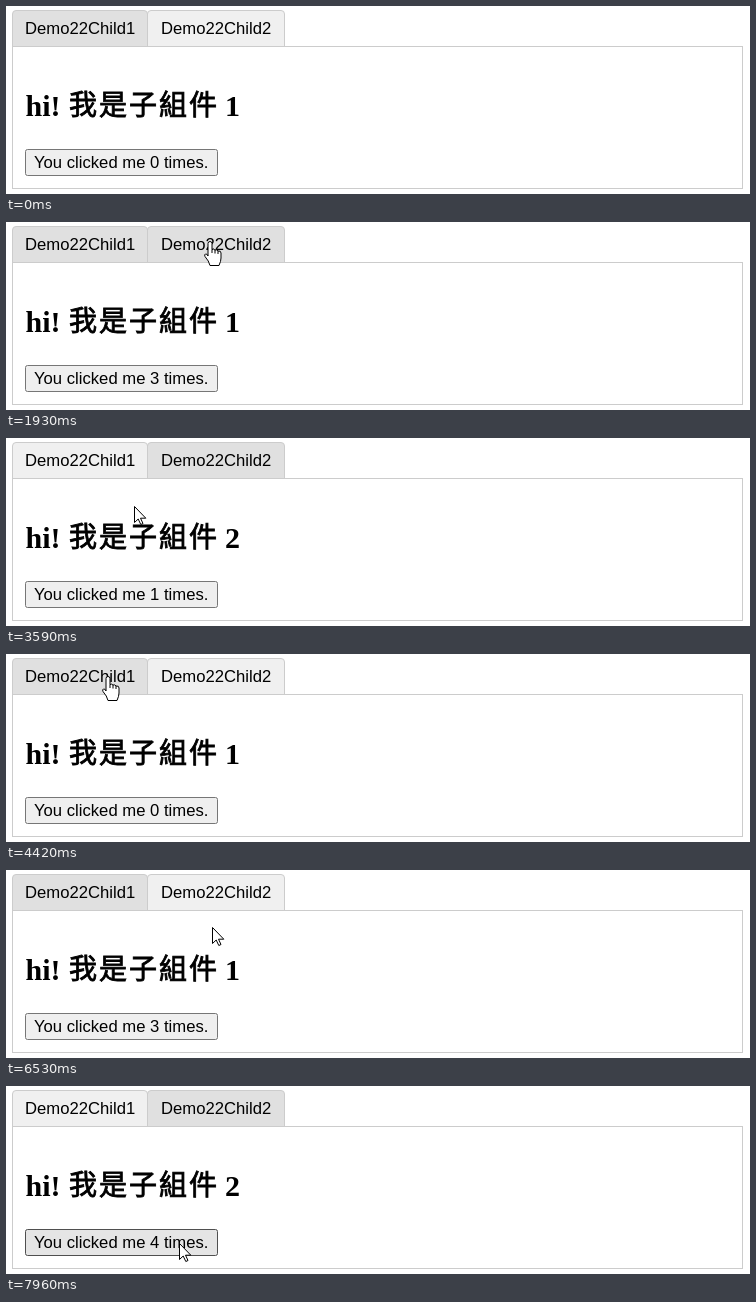
An HTML page for the animation above (8000 ms loop, 744 by 188 pixels).

```html
<!DOCTYPE html>
<html lang="zh-Hant">
<head>
<meta charset="utf-8">
<style>
  html, body { margin: 0; height: 100%; overflow: hidden; background: #fff; }
  svg { display: block; font: 16.67px "Liberation Sans", Arial, sans-serif; }
  .tab { stroke: #ccc; fill: #f0f0f0; }
  .tab.on { fill: #e0e0e0; }
  .panel { fill: #fff; stroke: #ccc; }
  .title { font: bold 30px "Liberation Serif", Times, serif; }
  .cjk { font: 500 28px "Noto Sans CJK TC", "Noto Sans CJK", sans-serif; letter-spacing: 2px; stroke: #000; stroke-width: .8; }
  #button { fill: #efefef; stroke: #767676; }
  #button.hover { fill: #e5e5e5; stroke: #4f4f4f; }
  #button.down { fill: #f5f5f5; stroke: #8d8d8d; }
  #cursor path { fill: #fff; stroke: #000; stroke-linejoin: round; }
</style>
</head>
<body>
<svg width="744" height="188">
  <path id="tab1" class="tab" d="M6.5 40.5V8q0-3.5 3.5-3.5H138q3.5 0 3.5 3.5V40.5z"/>
  <path id="tab2" class="tab" d="M141.5 40.5V8q0-3.5 3.5-3.5H275q3.5 0 3.5 3.5V40.5z"/>
  <text x="19" y="28">Demo22Child1</text>
  <text x="155" y="28">Demo22Child2</text>
  <rect class="panel" x="6.5" y="40.5" width="730" height="142"/>
  <text class="title" x="19.5" y="110">hi!</text>
  <text class="cjk" x="63" y="109">我是子組件</text>
  <text class="title" x="219" y="110" id="child">1</text>
  <rect id="button" x="19.5" y="143.5" width="192" height="26" rx="2"/>
  <text x="28" y="162">You clicked me <tspan id="count">0</tspan> times.</text>
  <g id="cursor">
    <path id="arrow" d="M.5.5V16.5L4.2 13 6.8 18.5 9 17.5 6.5 12.2H11.8z"/>
    <path id="hand" d="M-2 2.5Q-2 .5 0 .5T2 2.5V8.5Q3.5 7.5 5 9 7 8.3 8 10 11 9.5 11 12V17Q11 20 9 24.5H0Q-1 20-5 15.5-6 13.5-4.5 13T-2 15zM2 8.5V12M5 9V12.5M8 10V13"/>
  </g>
</svg>
<script>
const LOOP = 8000, TICK = 65.9, ENTER = 200;
const CLICK_GAP = 140, PRESS = 65, TRAVEL = 0.55;

// The pointer leaves for (x, y), then clicks there a number of times
const visit = (x, y, leave, click, times = 1) => ({ x, y, leave, click, times });
const visits = [
  visit(165, 163, 197, 1110, 3),
  visit(204, 19, 1470, 2130),
  visit(182, 165, 2680, 3320),
  visit(102, 22, 3430, 3970),
  visit(204, 19, 4415, 4750),
  visit(105, 20, 4860, 5230),
  visit(121, 146, 5270, 5990, 0),
  visit(196, 155, 5750, 5980, 3),
  visit(210, 20, 6430, 6790),
  visit(173, 157, 6850, 7280, 2),
  visit(173, 157, 7600, 7760, 2)
];

const el = id => document.getElementById(id);
const inside = (x, y, l, t, r, b) => x >= l && x < r && y >= t && y < b;
const onTab1 = (x, y) => inside(x, y, 6, 4, 141, 40);
const onTab2 = (x, y) => inside(x, y, 141, 4, 279, 40);
const onButton = (x, y) => inside(x, y, 19, 143, 212, 170);

function pointerAt(t) {
  let x = 466, y = 70;
  for (const v of visits) {
    if (t < v.leave) break;
    const k = Math.min(1, (t - v.leave) / (TRAVEL * (v.click - v.leave)));
    const eased = 1 - (1 - k) ** 2;
    x += (v.x - x) * eased;
    y += (v.y - y) * eased;
  }
  return [Math.round(x), Math.round(y)];
}

// A tab click shows a fresh child; a button click counts up
function stateAt(t) {
  const state = { child: 1, count: 0, pressed: false };
  for (const { x, y, click, times } of visits) {
    for (let i = 0; i < times; i++) {
      const at = click + i * CLICK_GAP;
      if (onButton(x, y)) {
        if (t >= at) state.count++;
        else if (t >= at - PRESS) state.pressed = true;
      } else if (t >= at) {
        state.child = onTab1(x, y) ? 1 : 2;
        state.count = 0;
      }
    }
  }
  return state;
}

function draw(t) {
  const visible = t >= ENTER;
  const [x, y] = pointerAt(Math.floor(t / TICK) * TICK);
  const { child, count, pressed } = stateAt(t);
  const hover1 = onTab1(x, y), hover2 = onTab2(x, y), hand = hover1 || hover2;

  el("tab1").classList.toggle("on", child === 1 || hover1);
  el("tab2").classList.toggle("on", child === 2 || hover2);
  el("child").textContent = child;
  el("count").textContent = count;
  el("button").classList.toggle("hover", onButton(x, y));
  el("button").classList.toggle("down", pressed);

  el("cursor").setAttribute("transform", `translate(${x} ${y})`);
  el("cursor").style.display = visible ? "" : "none";
  el("hand").style.display = hand ? "" : "none";
  el("arrow").style.display = hand ? "none" : "";
}

const start = performance.now();
function frame() {
  draw((performance.now() - start) % LOOP);
  requestAnimationFrame(frame);
}
frame();
</script>
</body>
</html>
```
